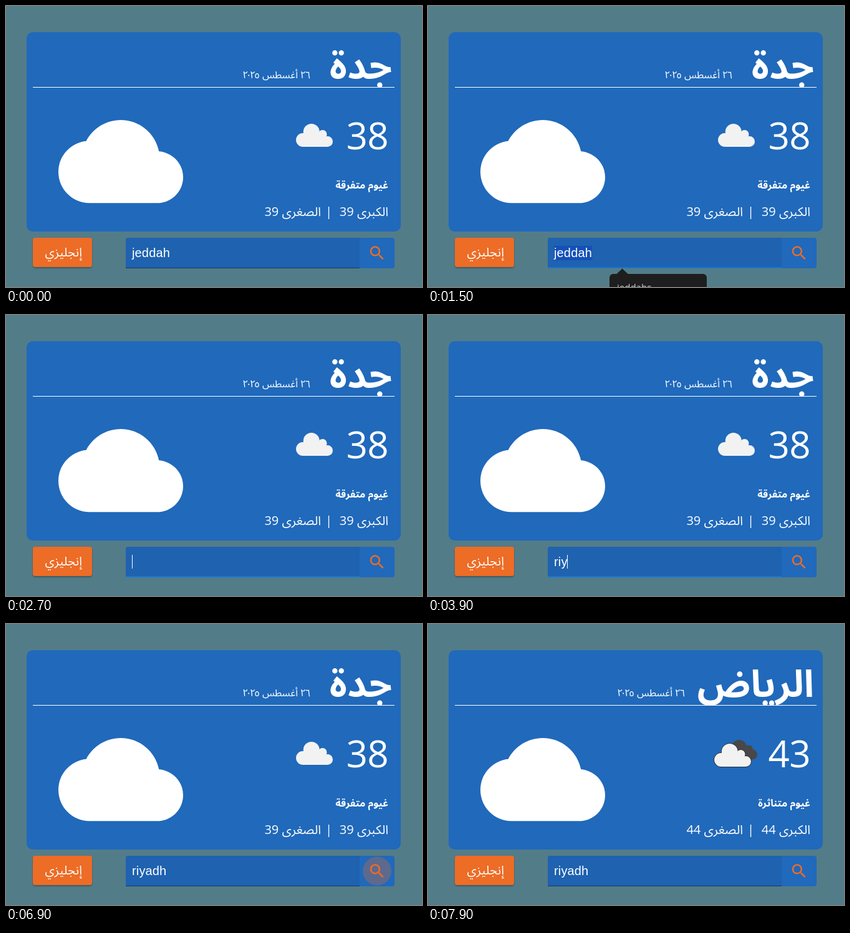
Recreate the animation shown at these times as an HTML page. Size 667 by 451 pixels, loop 8 s.

```html
<!DOCTYPE html>
<html lang="ar">
<head>
<meta charset="utf-8">
<style>
html, body { margin: 0; width: 100%; height: 100%; overflow: hidden; background: #537c89; }
svg { display: block; width: 667px; height: 451px; }
text { fill: #fff; font-family: "Open Sans", "Noto Sans Arabic", "DejaVu Sans", sans-serif; }
.rtl { direction: rtl; }
.field { font: 20px "Liberation Sans", sans-serif; letter-spacing: .15px; }
</style>
</head>
<body>
<svg viewBox="0 0 667 451">
  <defs>
    <filter id="shadow" x="-10%" y="-20%" width="120%" height="150%">
      <feDropShadow dx="0" dy="1.5" stdDeviation="1.2" flood-opacity=".35"/>
    </filter>
    <g id="puff">
      <circle cx="476" cy="215" r="11"/>
      <circle cx="489.700" cy="202" r="13"/>
      <circle cx="507.500" cy="206" r="7"/>
      <circle cx="515.500" cy="217.500" r="8.500"/>
      <path d="M476 205H508L516 212V226H476Z"/>
    </g>
  </defs>

  <rect x="33" y="42" width="600" height="320" rx="10" fill="#2069bb"/>
  <text id="city" class="rtl" x="619" y="117" font-size="60" font-weight="700"></text>
  <text id="date" class="rtl" y="116" font-size="16">٢٦ أغسطس ٢٠٢٥</text>
  <path d="M43 130.500H623" stroke="#fff"/>

  <path transform="translate(84 149.700) scale(8.333)" fill="#fff" d="M19.35 10.04C18.67 6.59 15.64 4 12 4 9.11 4 6.6 5.64 5.35 8.04 2.34 8.36 0 10.91 0 14c0 3.31 2.69 6 6 6h13c2.76 0 5-2.24 5-5 0-2.64-2.05-4.78-4.65-4.96z"/>
  <g id="fewClouds" fill="#f2f2f2"><use href="#puff"/></g>
  <g id="moreClouds">
    <g fill="#484848">
      <circle cx="499" cy="198" r="12"/>
      <circle cx="514" cy="201.500" r="7"/>
      <circle cx="520" cy="209.500" r="8"/>
      <path d="M499 200H516L520 217.500H505Z"/>
    </g>
    <use href="#puff" x="-6" y="3" fill="#f2f2f2" stroke="#222" stroke-width="1.500"/>
    <use href="#puff" x="-6" y="3" fill="#f2f2f2"/>
  </g>
  <text id="temp" x="613" y="230" font-size="60" text-anchor="end" letter-spacing="-.5"></text>
  <text id="sky" class="rtl" x="613" y="293" font-size="16" font-weight="700"></text>
  <text id="high" class="rtl" x="613" y="337" font-size="20"></text>
  <text x="517.500" y="337" font-size="20" text-anchor="middle">|</text>
  <text id="low" class="rtl" x="505" y="337" font-size="20"></text>

  <rect x="43" y="372" width="95" height="47" rx="4" fill="#ed6c27" filter="url(#shadow)"/>
  <text class="rtl" x="122" y="402" font-size="20">إنجليزي</text>

  <rect x="192" y="372" width="431" height="49" rx="4" fill="#2069bb"/>
  <path d="M567 372H196a4 4 0 0 0-4 4V421H567Z" fill="#1e62b0"/>
  <rect x="192" y="420" width="375" height="1" fill="#123b69"/>
  <rect id="line" x="192" y="419" width="375" height="2" fill="#1976d2"/>
  <rect id="mark" x="202" y="385" width="61" height="23" fill="#1450b8"/>
  <text id="typed" class="field" x="202" y="403"></text>
  <rect id="caret" y="385" width="1" height="22" fill="#fff"/>
  <circle id="ripple" cx="595" cy="396.500" fill="#ed6c27"/>
  <path transform="translate(580 381.500) scale(1.250)" fill="#ed6c27" d="M15.5 14h-.79l-.28-.27C15.41 12.59 16 11.11 16 9.5 16 5.91 13.09 3 9.5 3S3 5.91 3 9.5 5.91 16 9.5 16c1.61 0 3.09-.59 4.23-1.57l.27.28v.79l5 4.99L20.49 19l-4.99-5zm-6 0C7.01 14 5 11.99 5 9.5S7.01 5 9.5 5 14 7.01 14 9.5 11.99 14 9.5 14z"/>

  <g id="hint">
    <path d="M302 430.500L311.500 421.500L321 430.500Z" fill="#1e1e1e"/>
    <rect x="291" y="430" width="156" height="40" rx="6" fill="#1e1e1e"/>
    <text x="303" y="457" font-size="15" style="fill:#d0d0d0">jeddahs</text>
  </g>
</svg>
<script>
const LOOP = 8000;
const $ = id => document.getElementById(id);
const clamp = v => Math.min(1, Math.max(0, v));
const ramp = (t, from, to) => clamp((t - from) / (to - from));
const easeOut = p => 1 - (1 - p) ** 3;

// [time, field text, caret x or 0 when hidden]
const typing = [
  [0, "jeddah", 0], [2500, "", 202], [2900, "r", 209], [3200, "ri", 213],
  [3900, "riy", 223], [4100, "riya", 235], [4300, "riyad", 246],
  [5000, "riyad", 0], [5400, "riyadh", 257], [6000, "riyadh", 0]
];
const reports = [
  [0, { city: "جدة", date: 488, temp: 38, sky: "غيوم متفرقة", peak: 39 }],
  [7100, { city: "الرياض", date: 412, temp: 43, sky: "غيوم متناثرة", peak: 44 }]
];
const pick = (steps, t) => steps.findLast(s => s[0] <= t);

function setText(id, value) {
  if ($(id).textContent !== String(value)) $(id).textContent = value;
}
const show = (id, opacity) => $(id).setAttribute("opacity", +opacity);

function draw(t) {
  const w = pick(reports, t)[1];
  setText("city", w.city);
  setText("temp", w.temp);
  setText("sky", w.sky);
  setText("high", `الكبرى ${w.peak}`);
  setText("low", `الصغرى ${w.peak}`);
  $("date").setAttribute("x", w.date);
  show("fewClouds", w.temp === 38);
  show("moreClouds", w.temp === 43);

  const [, text, caret] = pick(typing, t);
  setText("typed", text);
  $("caret").setAttribute("x", caret);
  show("caret", caret > 0);
  show("mark", t >= 700 && t < 2500);
  show("hint", ramp(t, 1250, 1500) * (1 - ramp(t, 2480, 2700)));

  const focus = t < 6400 ? easeOut(ramp(t, 400, 600)) : 1 - easeOut(ramp(t, 6400, 6600));
  $("line").setAttribute("width", 375 * focus);
  $("line").setAttribute("x", 192 + 187.5 * (1 - focus));

  $("ripple").setAttribute("r", 23 * easeOut(ramp(t, 6400, 6850)));
  show("ripple", .3 * (1 - ramp(t, 7000, 7550)));
}

function tick() {
  draw(performance.now() % LOOP);
  requestAnimationFrame(tick);
}
tick();
</script>
</body>
</html>
```
